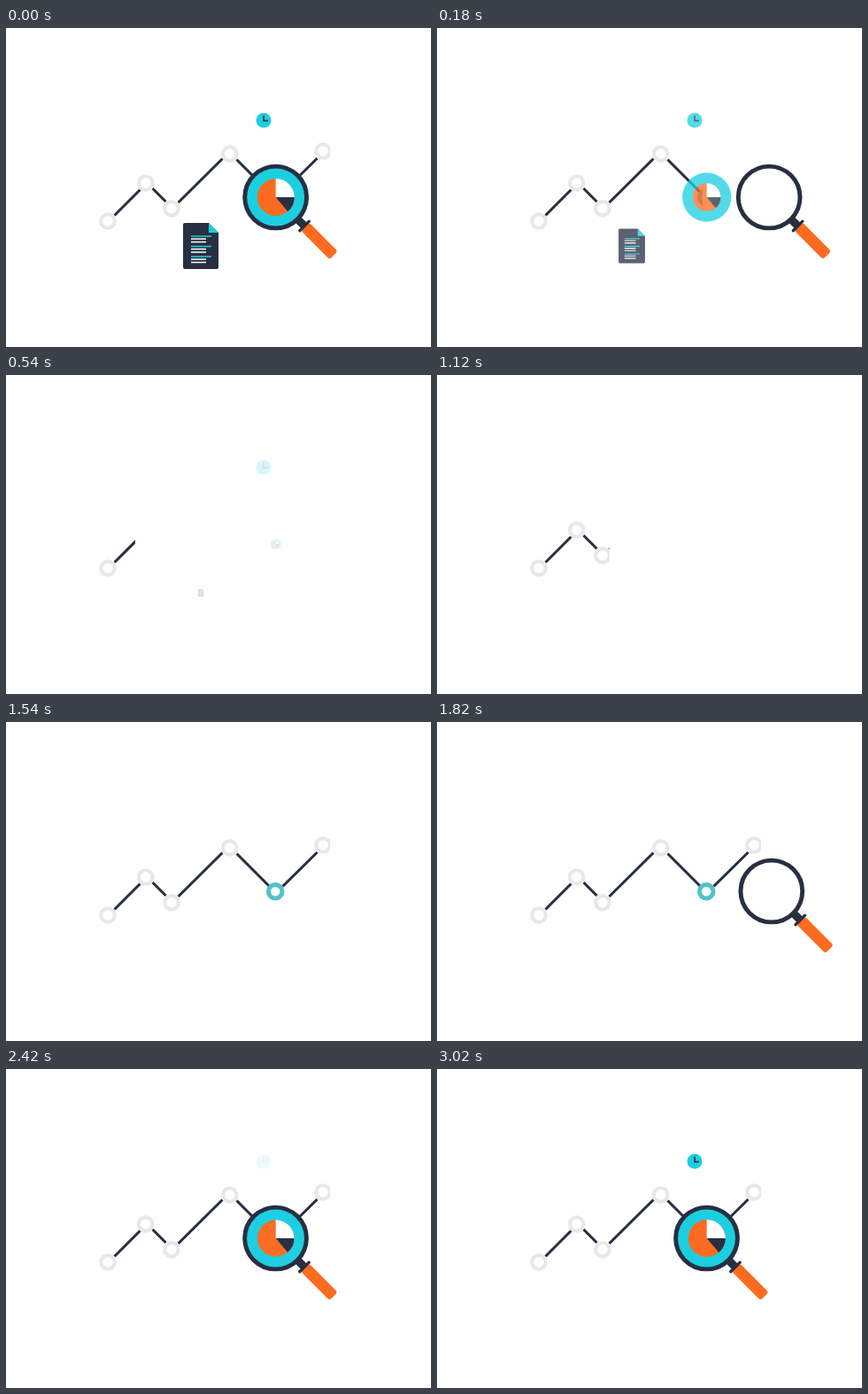
Write an HTML page that moves like this. It is 480 px wide and 360 px high and loops after 3.04 s.

```html
<!DOCTYPE html>
<html lang="en">
<head>
<meta charset="utf-8">
<title>Chart analysis</title>
<style>
  html, body { margin: 0; width: 100%; height: 100%; overflow: hidden; background: #fefefe; }
  svg { display: block; width: 100%; height: 100%; }
</style>
</head>
<body>
<svg viewBox="0 0 480 360">
  <clipPath id="wipe"><rect id="reveal" x="104" y="120" height="120"/></clipPath>
  <g clip-path="url(#wipe)" fill="none">
    <path stroke="#272f41" stroke-width="3.1" d="M122.5 211.5L151.5 182.5M165.5 181L180.5 196M194.5 197L244.5 147.5M260.5 148.5L297.5 185.5M312.5 185.5L351.5 147"/>
    <g id="nodes"></g>
  </g>

  <g id="doc">
    <path fill="#272f41" d="M-18-26H9L20-15V24a2 2 0 0 1-2 2H-18a2 2 0 0 1-2-2V-24a2 2 0 0 1 2-2z"/>
    <path fill="#1bcfe1" d="M9-26V-15H20z"/>
    <path stroke="#1bcfe1" stroke-width="1.5" d="M-11-11H12M-11 .5H12M-11 12H12"/>
    <path stroke="#fff" stroke-width="1.5" d="M-11-8H6M-11-4.5H6M-11 3.5H6M-11 7H6M-11 15H6M-11 18.5H6"/>
  </g>

  <g id="clock">
    <circle cx="291" cy="104.3" r="8.5" fill="#1bcfe1"/>
    <path d="M291 98.8V104.6H296" fill="none" stroke="#272f41" stroke-width="1.6"/>
  </g>

  <g id="pie">
    <circle r="37" fill="#1bcfe1"/>
    <circle r="21" fill="#fd6b20"/>
    <path fill="#fff" d="M0 0V-21A21 21 0 0 1 21 0z"/>
    <path fill="#272f41" d="M0 0H21A21 21 0 0 1 13.5 16.1z"/>
  </g>

  <g id="lens">
    <g transform="rotate(45)">
      <rect x="36" y="-4.5" width="10" height="9" fill="#272f41"/>
      <rect x="47" y="-6.5" width="45.5" height="13" rx="3" fill="#fd6b20"/>
      <rect x="44.2" y="-9" width="3.4" height="18" rx="1.5" fill="#272f41"/>
    </g>
    <circle r="34.9" fill="none" stroke="#272f41" stroke-width="4.9"/>
  </g>
</svg>
<script>
const LOOP = 3040, OUT = 1000, SLIDE = 280, CHART_WIDTH = 262;
const $ = id => document.getElementById(id);

const ring = (x, y, color, width) =>
  `<circle cx="${x}" cy="${y}" r="7.8" stroke="${color}" stroke-width="${width}"/>`;
$('nodes').innerHTML =
  [[115, 218], [157.7, 175], [187, 203.8], [252.7, 142], [358, 139]]
    .map(([x, y]) => ring(x, y, '#e8e8e8', 4.1)).join('') + ring(304.2, 191.2, '#52c1c9', 5);

// cubic-bezier(.25, .1, .25, 1), solved by bisection
function ease(t) {
  if (t <= 0) return 0;
  if (t >= 1) return 1;
  const bez = (s, a, b) => 3 * s * (1 - s) * (1 - s) * a + 3 * s * s * (1 - s) * b + s * s * s;
  let lo = 0, hi = 1;
  for (let i = 0; i < 24; i++) {
    const mid = (lo + hi) / 2;
    if (bez(mid, .25, .25) < t) lo = mid; else hi = mid;
  }
  return bez(lo, .1, 1);
}

function pop(id, x, y, k) {
  $(id).setAttribute('transform', `translate(${x} ${y}) scale(${k})`);
  $(id).setAttribute('opacity', k);
}

function draw() {
  const t = performance.now() % LOOP;
  // Everything leaves together, then each part enters in turn.
  const shown = (start, length = 500) => t < OUT ? 1 - ease(t / OUT) : ease((t - start) / length);

  $('reveal').setAttribute('width', CHART_WIDTH * shown(1010));
  $('lens').setAttribute('transform', `translate(${304.5 + SLIDE * (1 - shown(1600))} 191)`);
  pop('pie', 304.7, 191, shown(2000));
  pop('doc', 220, 246, t < OUT ? shown(0) : 0);
  $('clock').setAttribute('opacity', shown(2380));
  requestAnimationFrame(draw);
}
draw();
</script>
</body>
</html>
```
